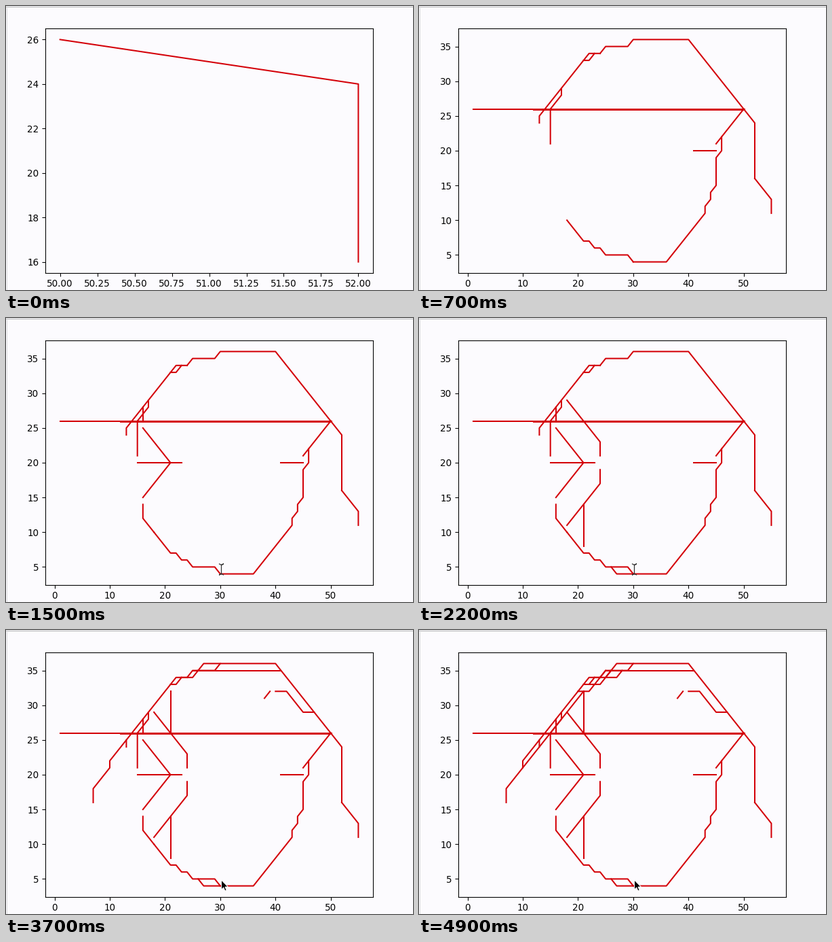
A matplotlib script that plays this animation: 600 px wide and 418 px high, repeating every 5000 ms.

```python
import numpy as np
import matplotlib.pyplot as plt
from matplotlib.animation import FuncAnimation
from matplotlib.patches import Polygon

W, H, DPI = 600, 418, 100
FRAMES, INTERVAL = 50, 100
SCALE = 0.974
PAPER, RED = "#fcfbfe", "#d40008"


def flip(points):
    """Mirror across the horizontal centre line of the drawing."""
    return [(x, 40 - y) for x, y in points]


def shelf(x, y):
    """Flat step two units wide that slopes up to the brim."""
    return [(x, y), (x + 2, y), (x + 37 - y, 35)]


def stairs(x, y, drops):
    """Descend by each drop, moving one unit diagonally after it."""
    points = [(x, y)]
    for drop in drops:
        points += [(x, y - drop), (x - 1, y - drop - 1)]
        x, y = points[-1]
    return points


edge = [(30, 36), (29, 35), (25, 35), (24, 34), (23, 34), (22, 33), (21, 33)]
toe = [(26, 35), (27, 36), (30, 36)]
post = [(21, 26), (21, 32)]
bar = [(16, 26), (16, 28)]
wing = [(18, 29), (24, 23), (24, 21)]

start_lines = [
    [(52, 16), (52, 24), (50, 26)],
    [(52, 16), (55, 13), (55, 11)],
    [(50, 26), (45, 21)],
    [(41, 20), (45, 20)],
    [(1, 26), (50, 26)],
]
outline = [
    [(50, 26), (40, 36)] + edge[:4],
    [(24, 34), (22, 34), (13, 25), (13, 24)],
    edge[4:],
    [(17, 29), (17, 28), (15, 26), (15, 21)],
    stairs(46, 22, [2, 4, 1, 1]) + [(36, 4), (30, 4)],
    flip(edge + [(18, 30)]),
    [(15, 20), (23, 20)],
]
inner = [
    flip([(18, 30)] + bar[::-1]),
    [(16, 15), (21, 20), (16, 25)],
    bar, wing, flip(wing), flip(post), flip(toe),
]
sides = [
    toe, post,
    [(13, 25), (10, 22), (10, 21), (7, 18), (7, 16)],
    [(38, 31), (39, 32)],
    [(40, 32), (42, 32), (45, 29), (47, 29)],
]
brim = [[(25, 35), (41, 35)], shelf(23, 34)]
hatching = [shelf(25, 34), shelf(22, 33), [(10, 21), (21, 32)], shelf(20, 32)]

# Each group appears stroke by stroke between its first and last frame
PHASES = [(start_lines, 0, 3), (outline, 4, 8), (inner, 11, 21),
          (sides, 23, 30), (brim, 33, 36), (hatching, 39, 48)]

plt.rcParams.update({
    "font.family": "DejaVu Sans", "font.size": 10 * SCALE,
    "axes.linewidth": 0.8 * SCALE, "lines.linewidth": 1.5 * SCALE,
})
for axis in ("xtick", "ytick"):
    plt.rcParams[axis + ".major.size"] = 3.5 * SCALE
    plt.rcParams[axis + ".major.pad"] = 3.5 * SCALE
    plt.rcParams[axis + ".major.width"] = 0.8 * SCALE

fig = plt.figure(figsize=(W / DPI, H / DPI), dpi=DPI, facecolor=PAPER)
ax = fig.add_axes([57.7 / W, (H - 393) / H, 483.7 / W, 360 / H], facecolor=PAPER)

strokes = []
for group, first, last in PHASES:
    for start, points in zip(np.linspace(first, last, len(group)).round(), group):
        line, = ax.plot(*zip(*points), color=RED)
        strokes.append((start, line))
bold, = ax.plot([12, 50], [26, 26], color=RED, lw=2.1)
strokes.append((3, bold))

# Overlay in screen pixels, origin at top left
screen = fig.add_axes([0, 0, 1, 1], facecolor="none")
screen.set(xlim=(0, W), ylim=(H, 0))
screen.axis("off")
screen.plot([0, W], [0.5, 0.5], color="#b4b4b6", lw=0.72)
screen.plot([0.5, 0.5], [0, H], color="#dcdcde", lw=0.72)

BEAM_IN, ARROW_IN = 9, 27
serif = np.array([(-3, -8), (0, -6.5), (3, -8), (0, -6.5)])
beam_shape = np.vstack([serif, -serif[1:], -serif[:1]])
beam_path = {9: (4.5, -6), 10: (150, 190), 11: (317, 387)}
beam, = screen.plot([], [], color="#333333", lw=0.9)

arrow_shape = np.array([(0, 0), (0, 14), (3.2, 11), (5.4, 16),
                        (7.6, 15), (5.5, 10.2), (9.8, 10)])
arrow = screen.add_patch(Polygon(arrow_shape + (317.5, 368), facecolor="black",
                                 edgecolor="white", lw=0.7))


def update(i):
    for start, line in strokes:
        line.set_visible(i >= start)
    ax.relim(visible_only=True)
    ax.autoscale(True)
    ax.autoscale_view()

    beam.set_data(*(beam_shape + beam_path.get(i, (317.5, 370))).T)
    beam.set_visible(BEAM_IN <= i < ARROW_IN)
    arrow.set_visible(i >= ARROW_IN)
    return []


anim = FuncAnimation(fig, update, frames=FRAMES, interval=INTERVAL,
                     repeat=True, repeat_delay=0, blit=False)
plt.show()
```
